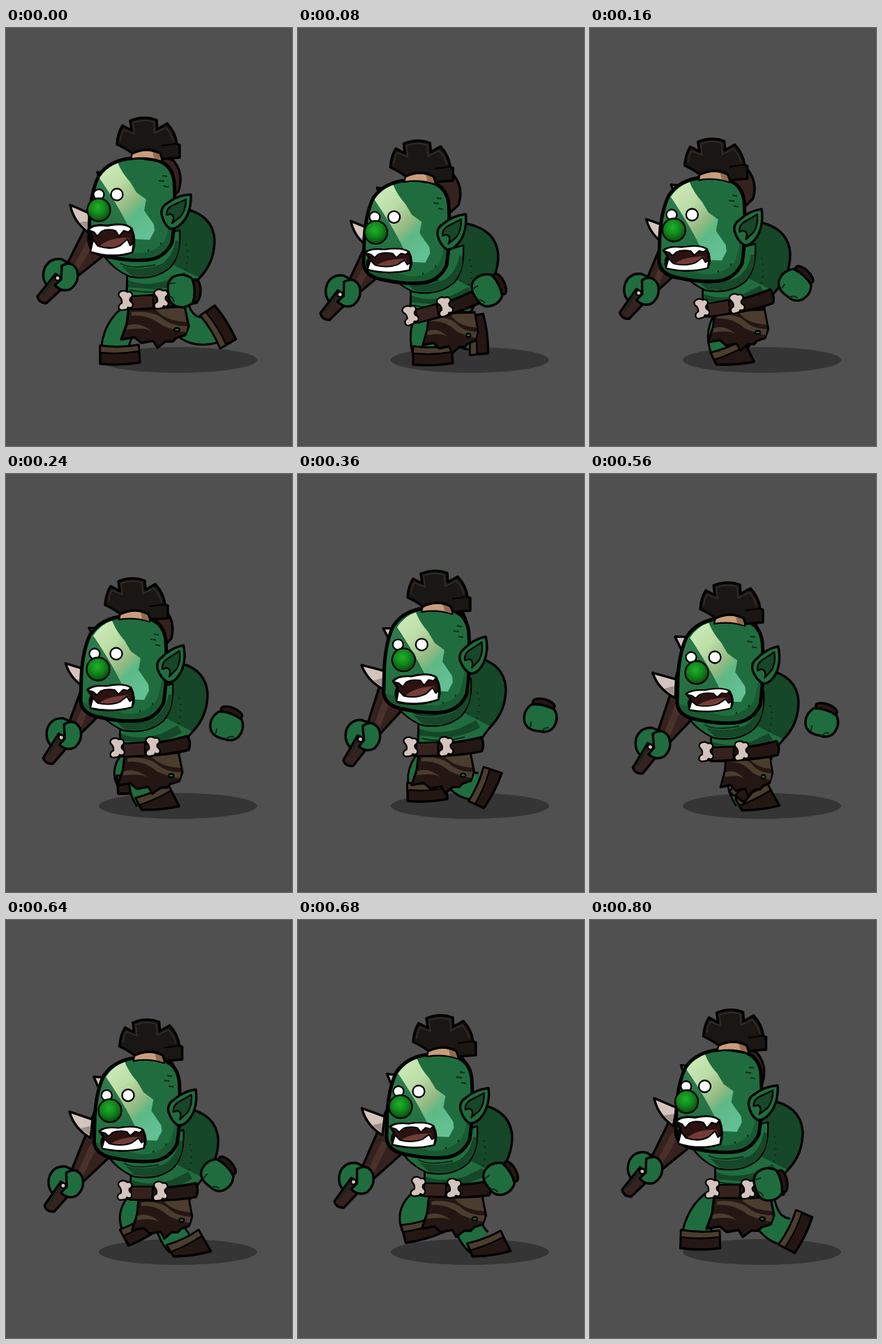
Recreate the animation shown at these times as an HTML page without scripts. Size 410 px wide and 600 px high, loop 0.84 s.

```html
<!DOCTYPE html>
<html lang="en">
<head>
<meta charset="utf-8">
<title>Running orc</title>
<style>
html, body { margin: 0; width: 100%; height: 100%; overflow: hidden; background: #505050; }
svg { display: block; width: 100%; height: 100%; }
path, circle, ellipse { stroke-linejoin: round; }
.ink { stroke: #000; stroke-width: 3.4; }
.thin { stroke: #000; stroke-width: 2.3; }
.line { fill: none; stroke: #0b2a18; stroke-width: 2; }
.skin { fill: #1f6d3e; }
.shade { fill: #154728; }
.wood { fill: #35221f; }
.leather { fill: #241713; }
.stripe { fill: #4b3d2e; }
.bone { fill: #d3c4bd; }
.leg { fill: none; stroke: #000; stroke-width: 42; }
.leg + .leg { stroke: #1f6d3e; stroke-width: 36; }

/* Every part advances once per 40 ms; each key sets the ticks to the next one. */
.move { animation: 840ms steps(3) infinite; }
.head { animation-name: head; }
.skull { animation-name: skull; transform-origin: 180px 333px; }
.shine { animation-name: shine; }
.face { animation-name: face; }
.eye { animation-name: eye; }
.mouth { animation-name: mouth; transform-origin: 150px 292px; }
.ear { animation-name: ear; transform-origin: 230px 272px; }
.hair { animation-name: hair; }
.torso { animation-name: torso; }
.club { animation-name: club; transform-origin: 57px 383px; }
.fist { animation-name: fist; transform-origin: 252px 377px; }
.belt { animation-name: belt; transform-origin: 196px 390px; }
.skirt { animation-name: skirt; transform-origin: 213px 405px; }
.near.boot { animation-name: near-boot; }
.far.boot { animation-name: far-boot; }
.near.leg { animation-name: near-leg; }
.far.leg { animation-name: far-leg; }
.sole { animation-name: sole; }
.collar { animation-name: collar; }
.far .move { animation-delay: -440ms; }

@keyframes head {
  0% { translate: 0 0; animation-timing-function: steps(2); }
  9.524% { translate: -25px 33px; animation-timing-function: steps(1); }
  14.286% { translate: -24px 35px; }
  28.571% { translate: -12px 21px; animation-timing-function: steps(4); }
  47.619% { translate: 9px 5px; animation-timing-function: steps(1); }
  52.381% { translate: 13px 14px; animation-timing-function: steps(1); }
  57.143% { translate: 11px 23px; animation-timing-function: steps(2); }
  66.667% { translate: 6px 24px; }
  80.952% { translate: 8px 8px; }
  95.238% { translate: 4px 0; animation-timing-function: steps(1); }
  100% { translate: 0 0; }
}
@keyframes torso {
  0% { translate: 0 0; animation-timing-function: steps(2); }
  9.524% { translate: -12px 22px; animation-timing-function: steps(1); }
  14.286% { translate: -13px 24px; }
  28.571% { translate: -10px 11px; animation-timing-function: steps(4); }
  47.619% { translate: 2px 1px; animation-timing-function: steps(1); }
  52.381% { translate: 3px 7px; animation-timing-function: steps(1); }
  57.143% { translate: 2px 17px; animation-timing-function: steps(2); }
  66.667% { translate: 0 22px; }
  80.952% { translate: 8px 6px; }
  95.238% { translate: 6px 0; animation-timing-function: steps(1); }
  100% { translate: 0 0; }
}
@keyframes skull {
  0%, 100% { scale: 1 1; animation-timing-function: steps(6); }
  28.571% { scale: 1 1.025; animation-timing-function: steps(8); }
  66.667% { scale: 1 1.025; animation-timing-function: steps(7); }
}
@keyframes shine {
  0%, 100% { translate: 0 0; animation-timing-function: steps(6); }
  28.571% { translate: 4px 0; animation-timing-function: steps(5); }
  52.381% { translate: 6px 0; animation-timing-function: steps(10); }
}
@keyframes face {
  0% { translate: 0 0; animation-timing-function: steps(6); }
  28.571% { translate: 11px -2px; animation-timing-function: steps(5); }
  52.381% { translate: 17px -4px; }
  66.667% { translate: 14px 0; }
  80.952% { translate: 6px -1px; animation-timing-function: steps(4); }
  100% { translate: 0 0; }
}
@keyframes eye {
  0% { translate: 0 0; animation-timing-function: steps(6); }
  28.571% { translate: -5px 0; animation-timing-function: steps(5); }
  52.381% { translate: -10px 0; }
  66.667% { translate: -8px 0; }
  80.952% { translate: -3px 0; animation-timing-function: steps(4); }
  100% { translate: 0 0; }
}
@keyframes mouth {
  0% { scale: 1 1; rotate: 0deg; animation-timing-function: steps(2); }
  9.524% { scale: 1 .77; rotate: 0deg; animation-timing-function: steps(4); }
  28.571% { scale: 1 .82; rotate: -2deg; animation-timing-function: steps(5); }
  52.381% { scale: 1 1; rotate: -5deg; }
  66.667% { scale: 1 .72; rotate: -3deg; }
  80.952% { scale: 1 .8; rotate: 0deg; }
  95.238%, 100% { scale: 1 1; rotate: 0deg; }
}
@keyframes ear {
  0% { translate: 0 0; rotate: 0deg; animation-timing-function: steps(6); }
  28.571% { translate: 7px -9px; rotate: -9deg; animation-timing-function: steps(8); }
  66.667% { translate: 5px -10px; rotate: -10deg; }
  80.952% { translate: 2px -4px; rotate: -3deg; animation-timing-function: steps(4); }
  100% { translate: 0 0; rotate: 0deg; }
}
@keyframes hair {
  0% { translate: 0 0; animation-timing-function: steps(6); }
  28.571% { translate: -5px 0; animation-timing-function: steps(8); }
  66.667% { translate: -7px 3px; }
  80.952% { translate: -2px 0; animation-timing-function: steps(4); }
  100% { translate: 0 0; }
}
@keyframes club {
  0% { translate: 0 0; rotate: 0deg; animation-timing-function: steps(2); }
  9.524% { translate: -13px 24px; rotate: -1.5deg; animation-timing-function: steps(4); }
  28.571% { translate: 8px 21px; rotate: -6.4deg; animation-timing-function: steps(5); }
  52.381% { translate: 27px 26px; rotate: -10.6deg; }
  66.667% { translate: 16px 35px; rotate: -8deg; }
  80.952% { translate: 7px 18px; rotate: -3.3deg; }
  95.238% { translate: 1px 2px; rotate: -.5deg; animation-timing-function: steps(1); }
  100% { translate: 0 0; rotate: 0deg; }
}
@keyframes fist {
  0% { translate: 0 0; rotate: 0deg; animation-timing-function: steps(2); }
  9.524% { translate: 19px -1px; rotate: -25deg; animation-timing-function: steps(4); }
  28.571% { translate: 64px -16px; rotate: -68deg; animation-timing-function: steps(5); }
  52.381% { translate: 116px -35px; rotate: -80deg; }
  66.667% { translate: 80px -21px; rotate: -70deg; }
  80.952% { translate: 36px -6px; rotate: -30deg; }
  95.238% { translate: 4px 2px; rotate: -12deg; animation-timing-function: steps(1); }
  100% { translate: 0 0; rotate: 0deg; }
}
@keyframes belt {
  0% { translate: 0 0; rotate: 0deg; animation-timing-function: steps(2); }
  9.524% { translate: -11px 16px; rotate: -12deg; animation-timing-function: steps(4); }
  28.571% { translate: -12px 2px; rotate: 0deg; animation-timing-function: steps(5); }
  52.381% { translate: -9px 1px; rotate: 3deg; }
  66.667% { translate: -5px 8px; rotate: 1deg; }
  80.952% { translate: 1px -6px; rotate: 5deg; }
  95.238% { translate: 4px -4px; rotate: 3deg; animation-timing-function: steps(1); }
  100% { translate: 0 0; rotate: 0deg; }
}
@keyframes skirt {
  0% { translate: 0 0; scale: 1 1; animation-timing-function: steps(2); }
  9.524% { translate: 5px 8px; scale: .82 1; animation-timing-function: steps(4); }
  28.571% { translate: -7px 0; scale: .96 1; animation-timing-function: steps(5); }
  52.381% { translate: -5px -1px; scale: .9 1; }
  66.667% { translate: 11px 0; scale: .77 1.06; }
  80.952% { translate: 10px -4px; scale: .95 1; }
  95.238% { translate: 2px -4px; scale: 1 1; animation-timing-function: steps(1); }
  100% { translate: 0 0; scale: 1 1; }
}
@keyframes near-boot {
  0%, 100% { translate: 163px 471px; rotate: 0deg; animation-timing-function: steps(2); }
  9.524% { translate: 193px 472px; rotate: 0deg; animation-timing-function: steps(4); }
  28.571% { translate: 219px 469px; rotate: -2deg; animation-timing-function: steps(4); }
  47.619% { translate: 287px 444px; rotate: -80deg; animation-timing-function: steps(1); }
  52.381% { translate: 288px 431px; rotate: -113deg; }
  66.667% { translate: 228px 442px; rotate: -55deg; }
  80.952% { translate: 179px 446px; rotate: -14deg; }
  95.238% { translate: 158px 461px; rotate: 2deg; animation-timing-function: steps(1); }
}
@keyframes far-boot {
  0%, 100% { translate: 306px 428px; rotate: -120deg; animation-timing-function: steps(2); }
  9.524% { translate: 259px 440px; rotate: -95deg; animation-timing-function: steps(4); }
  28.571% { translate: 188px 446px; rotate: -4deg; animation-timing-function: steps(4); }
  47.619% { translate: 184px 462px; rotate: 0deg; animation-timing-function: steps(1); }
  52.381% { translate: 199px 472px; rotate: -1deg; }
  66.667% { translate: 242px 469px; rotate: -4deg; }
  80.952% { translate: 275px 469px; rotate: -5deg; }
  95.238% { translate: 297px 448px; rotate: -62deg; animation-timing-function: steps(1); }
}
/* The foot rolls onto its toe while the heel lifts the collar. */
@keyframes sole {
  0%, 9.524%, 47.619%, 100% { d: path("M-28-15Q0-11 27-16L29 9Q0 14-28 11Z"); animation-timing-function: steps(2); }
  19.048%, 28.571% { d: path("M-33-5Q-6-11 14-23L29 9Q0 14-25 12Z"); animation-timing-function: steps(4); }
}
@keyframes collar {
  0%, 9.524%, 47.619%, 100% { d: path("M-28-15Q0-11 27-16L28-7Q0-2-28-5Z"); animation-timing-function: steps(2); }
  19.048%, 28.571% { d: path("M-33-5Q-6-11 14-23L18-14Q-4-2-28 5Z"); animation-timing-function: steps(4); }
}
@keyframes near-leg {
  0%, 100% { d: path("M192 408Q160 425 156 460"); animation-timing-function: steps(2); }
  9.524% { d: path("M192 415Q176 432 183 462"); animation-timing-function: steps(4); }
  28.571% { d: path("M210 410Q186 440 204 466"); animation-timing-function: steps(4); }
  47.619% { d: path("M225 405Q235 450 276 443"); animation-timing-function: steps(1); }
  52.381% { d: path("M232 396Q242 448 284 435"); }
  66.667% { d: path("M222 405Q214 425 220 436"); }
  80.952% { d: path("M190 398Q156 415 169 442"); }
  95.238% { d: path("M190 400Q160 415 152 450"); animation-timing-function: steps(1); }
}
@keyframes far-leg {
  0%, 100% { d: path("M240 394Q254 446 300 432"); animation-timing-function: steps(2); }
  9.524% { d: path("M225 410Q232 445 252 442"); animation-timing-function: steps(4); }
  28.571% { d: path("M190 405Q166 425 180 442"); animation-timing-function: steps(4); }
  47.619% { d: path("M195 405Q172 430 180 452"); animation-timing-function: steps(1); }
  52.381% { d: path("M205 405Q188 435 191 462"); }
  66.667% { d: path("M222 405Q208 438 226 466"); }
  80.952% { d: path("M240 400Q238 445 260 463"); }
  95.238% { d: path("M244 398Q252 446 286 448"); animation-timing-function: steps(1); }
}
</style>
</head>
<body>
<svg viewBox="0 0 410 600">
  <defs>
    <linearGradient id="shine" x1="0" y1="0" x2=".7" y2="1">
      <stop offset="0" stop-color="#cfeebf"/>
      <stop offset=".35" stop-color="#bddda6"/>
      <stop offset=".62" stop-color="#93b982"/>
      <stop offset=".75" stop-color="#5db986"/>
      <stop offset="1" stop-color="#63c093"/>
    </linearGradient>
    <linearGradient id="cheek" x1="0" y1="0" x2="0" y2="1">
      <stop offset="0" stop-color="#307c4e"/>
      <stop offset="1" stop-color="#1f6d3e"/>
    </linearGradient>
    <radialGradient id="nose" cx=".45" cy=".38" r=".6">
      <stop offset="0" stop-color="#22b02a"/>
      <stop offset=".5" stop-color="#128a1c"/>
      <stop offset="1" stop-color="#07500f"/>
    </radialGradient>
    <path id="knuckle" class="bone thin" d="M-5 4C-12 7-10 15-4 14S3 13 4 10C11 13 13 5 8 2Q6 0 7-3C13-7 9-14 3-12C-2-16-12-13-9-6Q-4-2-5 4Z"/>
    <path id="outline" d="M180 187Q148 190 133 212Q122 234 120 270L119 306Q121 325 150 329Q178 335 202 333Q227 331 238 308Q244 270 241 220Q237 190 205 188Q192 185 180 187Z"/>
  </defs>

  <ellipse cx="246.500" cy="476.500" rx="113.500" ry="18.500" fill="#353535"/>

  <g class="move club">
    <path class="wood ink" d="M82 350L112 290L148 215Q198 172 240 190Q256 210 247 235L142 325L103 356Z"/>
    <path fill="#4a302b" d="M92 350L118 303L128 306L104 347Z"/>
    <path class="bone ink" d="M124 268Q106 260 92 254Q97 279 119 294Z"/>
    <path fill="#9d8f89" d="M120 277L105 279L118 290Z"/>
    <path class="bone ink" d="M150 210L131 207L138 228Z"/>
    <path class="skin ink" d="M61 372Q49 360 56 343Q64 329 80 332L94 340L86 368Z"/>
    <path class="wood ink" d="M45 385L71 353L89 366L58 395Q47 395 45 385Z"/>
    <path class="line" d="M52 383L70 361" stroke="#654740"/>
    <path class="skin ink" d="M80 341Q95 333 102 348Q106 365 92 375Q80 380 70 369L79 361Z"/>
    <circle class="bone thin" cx="74" cy="359" r="3.600"/>
  </g>

  <path class="move far leg" d="M240 394Q254 446 300 432"/>
  <path class="move far leg" d="M240 394Q254 446 300 432"/>
  <g class="move far boot">
    <path class="move sole leather ink" d="M-28-15Q0-11 27-16L29 9Q0 14-28 11Z"/>
    <path class="move collar stripe thin" d="M-28-15Q0-11 27-16L28-7Q0-2-28-5Z"/>
  </g>
  <path class="move near leg" d="M192 408Q160 425 156 460"/>
  <path class="move near leg" d="M192 408Q160 425 156 460"/>
  <g class="move near boot">
    <path class="move sole leather ink" d="M-28-15Q0-11 27-16L29 9Q0 14-28 11Z"/>
    <path class="move collar stripe thin" d="M-28-15Q0-11 27-16L28-7Q0-2-28-5Z"/>
  </g>

  <g class="move torso">
    <path class="shade ink" d="M138 322Q152 346 174 352L173 390H258Q266 370 280 356Q299 335 299 304Q296 262 240 257Z"/>
    <path class="skin" d="M175 350V390H254Q264 372 276 358L240 340Z"/>
    <path class="shade" d="M175 362Q200 372 232 362L256 350L262 360Q240 374 210 375L175 372Z"/>
    <path class="skin thin" d="M138 322Q152 346 178 357Q214 363 236 343Q251 325 249 290Z"/>
    <path class="shade" d="M166 342Q200 350 224 338Q240 326 243 305L248 306Q249 327 235 342Q214 361 179 355Z"/>
    <path class="line" d="M164 338Q180 347 214 340M177 376Q206 383 240 374"/>
    <path class="line" stroke-dasharray="2 7" d="M258 310Q264 330 256 350"/>
  </g>

  <g class="move skirt">
    <path class="leather ink" d="M176 400H256L262 428L257 441L244 445L239 450L229 450L217 459L211 449L194 452L184 444L165 447L173 425Z"/>
    <path class="stripe" d="M180 413Q204 411 224 427Q240 434 258 437L260 428Q236 428 222 415Q206 405 180 408Z"/>
    <path class="stripe" d="M214 403Q226 420 259 422L255 402Z"/>
    <path class="stripe" d="M174 427Q192 421 210 436Q200 429 173 433Z"/>
    <ellipse class="thin skin" cx="245" cy="433" rx="4" ry="2.500"/>
  </g>

  <g class="move belt">
    <path class="leather ink" d="M175 386Q225 388 272 374Q278 383 274 394Q235 404 175 403Z"/>
    <path class="wood thin" d="M180 385L211 383V402L180 404Z"/>
    <use href="#knuckle" x="171" y="391"/>
    <use href="#knuckle" x="222" y="389"/>
  </g>

  <g class="move fist">
    <ellipse class="leather ink" cx="272" cy="377" rx="7" ry="16"/>
    <path class="skin ink" d="M240 357Q254 350 267 360Q273 377 268 394Q258 404 243 399Q233 394 233 382Q229 364 240 357Z"/>
    <path class="line" d="M233 384Q240 386 241 393M235 367L243 366"/>
  </g>

  <g class="move head">
    <g class="move skull">
      <use href="#outline" class="skin"/>
      <path fill="url(#cheek)" d="M134 211Q122 232 120 270L119 300L186 304Q172 265 134 211Z"/>
      <path fill="#185932" d="M119 306Q121 325 150 329Q178 335 202 333Q225 331 238 308Q243 270 241 222Q237 285 227 306Q208 326 182 323Z"/>
      <path class="move shine" fill="url(#shine)" d="M133 214Q144 198 160 193Q166 208 178 221L187 236L201 246L198 262L212 282L213 291L206 304L183 303Q170 268 133 214Z"/>
      <path class="line" d="M224 212L231 213M219 219L227 220M226 227L233 228M204 318V321M222 308V311"/>
      <use href="#outline" class="ink" fill="none" style="stroke-width:5"/>
    </g>

    <g class="move ear">
      <path class="skin ink" d="M223 267Q222 256 232 251Q246 240 265 239Q266 259 257 274Q246 290 235 288Q226 282 223 267Z"/>
      <path class="shade thin" d="M230 268Q230 258 240 254L258 246Q258 261 250 271L238 280Q243 270 236 267Z"/>
    </g>

    <g class="move hair">
      <path class="thin" fill="#c99d79" d="M181 179Q202 170 223 180V191Q202 184 179 188Z"/>
      <path fill="#94694d" d="M210 177L222 180V190L212 187Z"/>
      <path class="ink" fill="#191613" d="M159 167Q160 151 167 140L180 147L178 133Q198 125 216 132L217 145L231 137Q243 150 245 166L249 168V186L224 188L221 180Q202 170 181 180Q172 173 159 167Z"/>
      <path class="line" style="stroke:#302a26" d="M164 162Q165 152 169 146L184 152L182 136Q198 130 212 135L213 151L229 143Q237 151 240 163"/>
      <path class="line" style="stroke:#000" d="M223 169L245 166"/>
    </g>

    <g class="move face">
      <g class="move eye"><circle class="thin" fill="#fff" cx="133" cy="239" r="7.500"/></g>
      <circle class="thin" fill="#fff" cx="159" cy="239" r="8.500"/>
      <circle class="thin" fill="url(#nose)" cx="133" cy="261" r="16.500"/>
      <g class="move mouth">
        <path class="ink" fill="#2b1211" d="M118 289Q125 281 145 284Q170 279 180 288Q187 306 181 322Q152 331 123 322Q118 306 124 300Z"/>
        <path fill="#713c38" d="M133 314Q146 301 176 301L179 314Q154 320 133 314Z"/>
        <path class="thin" fill="#fff" d="M118 290Q125 281 145 284Q170 279 180 288L176 293L169 291L162 299L157 291Q145 288 137 292L131 299L126 293Z"/>
        <path class="thin" fill="#fff" d="M121 321L125 304L132 313Q150 319 164 312L174 303L178 312L183 308L181 322Q152 331 121 321Z"/>
      </g>
    </g>
  </g>
</svg>
</body>
</html>
```
